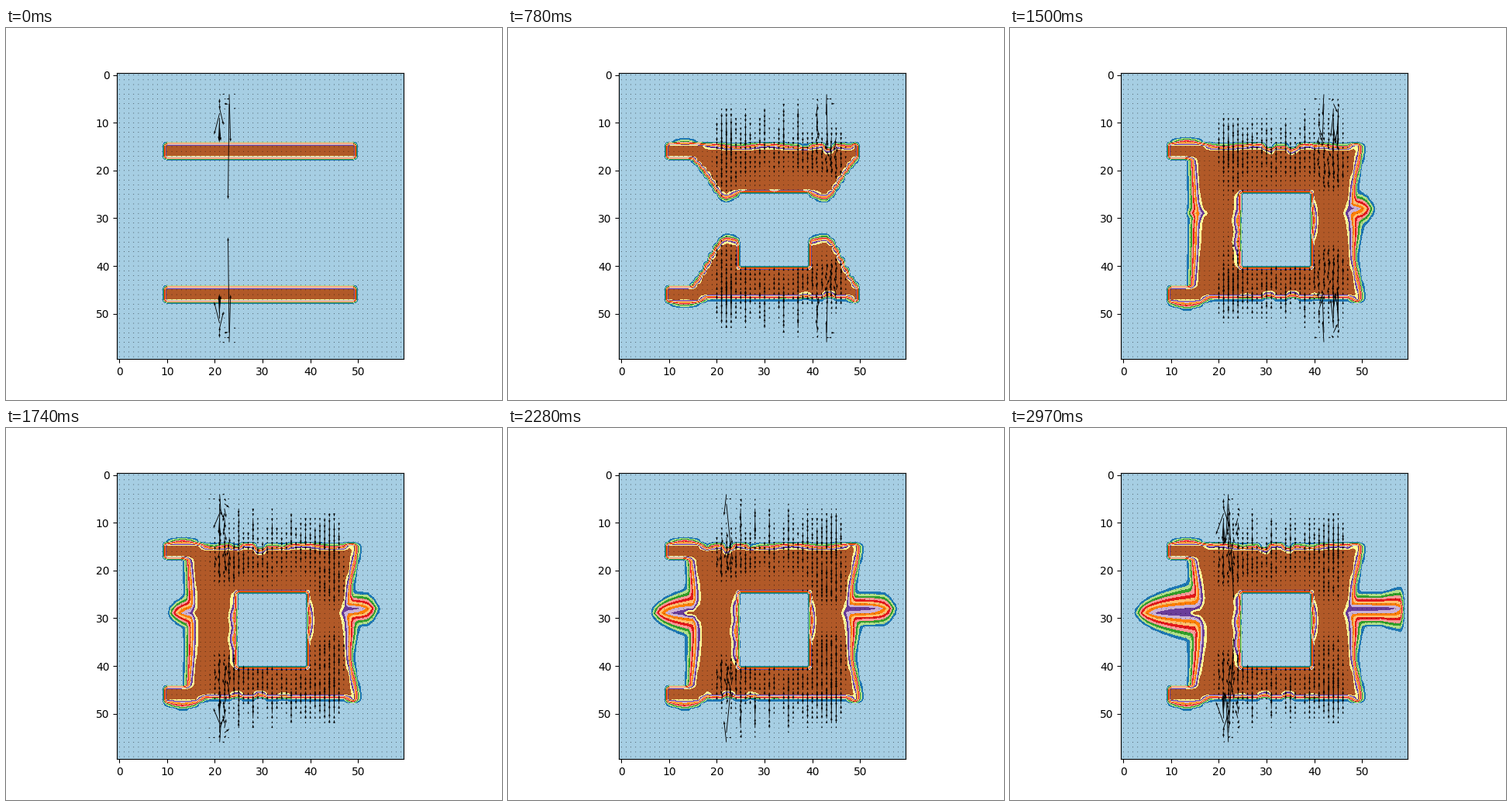
A matplotlib script that plays this animation: 640 by 480 pixels, repeating every 3 s.

```python
import numpy as np
import matplotlib.pyplot as plt
from matplotlib.animation import FuncAnimation

N, FRAMES, STEP = 60, 100, 30
Y, X = np.mgrid[0:N, 0:N].astype(float)
AXIS = np.arange(N, dtype=float)
HOLE = (slice(25, 41), slice(25, 40))

rng = np.random.default_rng(4)
ROUGH = rng.uniform(0.55, 1.45, (N, N))
SWIRL = rng.normal(0, 1, (N, N))


def span(v, a, b):
    return np.clip((v - a) / (b - a), 0, 1)


def smooth(s):
    return s * s * (3 - 2 * s)


def bump(v, center, width):
    return np.exp(-((v - center) / width) ** 2)


def peak(v, center, width):
    return np.exp(-np.abs(v - center) / width)


def ramp(v, rim, solid):
    """Density across an edge: first visible at rim, full at solid."""
    return smooth(np.clip(0.17 + 0.66 * (v - rim) / (solid - rim), 0, 1))


def long_edges(t):
    """Top edge of the upper bar and bottom edge of the lower one."""
    worn = span(t, 0, 400) * span(AXIS, 16, 18) * span(AXIS, 49, 47)
    center = 33 + 11 * np.cos(2 * np.pi * (t - 765) / 3000)
    bite = worn * bump(AXIS, center, 5) * np.maximum(0, np.sin(1.25 * AXIS + t / 200))
    drift = worn * (0.25 + 0.2 * np.sin(0.5 * AXIS + t / 400))
    swell = span(t, 300, 1200) * bump(AXIS, 13.3, 3)
    top = ramp(Y, 14.25 + drift + 0.9 * bite - swell,
               14.75 + 0.4 * worn + drift + 1.4 * bite)
    bottom = ramp(Y, 47.75 - 0.6 * worn - 0.4 * bite + 1.6 * swell,
                  47.25 - 1.25 * worn - 0.8 * bite - 0.2 * swell)
    return top, bottom


def early(t, top, bottom):
    """Two bodies swelling towards each other."""
    s = t / 480
    left = smooth(span(AXIS, 14, 25.5 - 2.2 * s))
    right = smooth(span(AXIS, 50, 36.5 + 4 * s))
    plume = left * right
    ripple = 0.5 * min(s, 1) * plume * np.sin(0.9 * AXIS + 1)
    width = 0.5 + 1.1 * np.sqrt(min(s, 1)) * plume ** 0.5
    upper = 17.75 + 4.6 * s ** 1.24 * plume + ripple
    lower = 44.25 - 6.3 * s ** 1.06 * plume - 0.5 * ripple
    ends = ramp(X, 9.25, 9.75) * ramp(X, 49.75, 49.25)
    return ends * np.maximum(top * ramp(Y, upper, upper - width),
                             bottom * ramp(Y, lower, lower + width))


def tongue(depth, dy, half):
    core = 0.86 * (1 - np.exp(-depth / 1.7))
    return core * np.clip(1 - np.abs(dy) / np.maximum(half, 0.01), 0, 1)


def flanks(t):
    """Left and right sides of the joined body."""
    pinch = span(t, 1500, 1050)
    aged = span(t, 1050, 2970)
    u = span(AXIS, 16, 46)
    belly = np.sin(np.pi * u)
    cusp = span(t, 1500, 2010)

    rim = 13.5 + 8.5 * pinch * peak(AXIS, 30, 4)
    solid = rim + 1.6 + (0.8 + 1.7 * aged) * belly
    solid += (1.4 * (1 - cusp) * (1 - pinch) - 3 * cusp) * peak(AXIS, 29, 1)
    bar = (AXIS < 18) | (AXIS > 44)
    rim, solid = np.where(bar, 9.25, rim), np.where(bar, 9.75, solid)
    left = ramp(X, rim[:, None], solid[:, None])
    shade = (0.8 * span(t, 1050, 2010) * belly * ~bar)[:, None]
    left = np.maximum(left, 0.14 * ramp(X, rim[:, None] - shade, rim[:, None]))

    rim = 49.8 + 0.6 * np.cos(4 * np.pi * u) - 2.5 * pinch * peak(AXIS, 29, 2)
    solid = 48.9 - 2 * belly - (1 + 2 * pinch) * peak(AXIS, 29, 1.5)
    return left * ramp(X, rim[:, None], solid[:, None])


def late(t, top, bottom):
    body = top * bottom * flanks(t)
    tip = 24 - 11 * span(t, 1050, 1500) - 10.7 * span(t, 1500, 2970) ** 0.7
    d = np.maximum(X - tip, 0)
    body = np.maximum(body, tongue(d, Y - 28.8, 2.05 * np.sqrt(d)) * (X < 19))

    d = np.maximum(46 + 15 * span(t, 1050, 2970) ** 0.55 - X, 0)
    flare = 0.35 * span(t, 2280, 2970) * np.maximum(X - 54, 0)
    half = np.minimum(2.6 * np.sqrt(d), 4) + flare
    return np.maximum(body, tongue(d, Y - 28.2, half) * (X > 45) * (X < 59))


def density(t):
    top, bottom = long_edges(t)
    w = span(t, 900, 1050)
    d = np.zeros((N, N))
    if w < 1:
        d += (1 - w) * early(t, top, bottom)
    if w > 0:
        d += w * late(t, top, bottom)

    # thinner fluid beside the block
    along = np.sqrt(np.sin(np.pi * span(Y, 24.5, 40.5)))
    wave = 0.8 + 0.2 * np.sin(1.3 * Y + t / 250)
    strip = 0.45 * (X == 24) + 0.12 * (X == 23)
    d *= 1 - w * (strip * along * wave + 0.4 * (X == 40) * bump(Y, 30.5, 3.5))
    d[HOLE] = 0
    return d


def jet_col(k):
    return int(round(33.1 + 12.3 * np.cos(0.316 * k - 2.51)))


def velocity(i):
    """Jet at the current column plus the sinking, spreading wakes of earlier ones."""
    v = np.zeros((N, N))
    for age in range(1, min(i + 3, 32)):
        amp = 0.5 / (1 + 0.25 * age)
        rows = bump(AXIS, 8 + 0.45 * age, 2.8 + 0.1 * age)
        cols = bump(AXIS, jet_col(i - age), 0.5 + 0.07 * age)
        v += amp * np.outer(rows, cols)
    v = np.minimum(v, 0.6) * ROUGH

    c = jet_col(i)
    close = bump(X, c, 3)
    u = 0.22 * SWIRL * v * close
    u += 0.1 * SWIRL * close * bump(Y, 5.5, 1.8)
    reach = (9 + 11 * max(0, np.cos(2 * np.pi * i / FRAMES)) ** 3) / 6
    v[4, c], v[6, c] = reach / 2, reach

    # the lower half mirrors the upper
    u[31:], v[31:] = u[29:0:-1], -v[29:0:-1]
    u[30] = v[30] = 0
    u[HOLE] = v[HOLE] = 0
    return u, v


fig, ax = plt.subplots(figsize=(6.4, 4.8), dpi=100)
im = ax.imshow(density(0), cmap="Paired", vmin=0, vmax=1, interpolation="bilinear")
arrows = ax.quiver(*velocity(0), scale=10, angles="xy")
ax.set(xlim=(-0.5, 59.5), ylim=(59.5, -0.5),
       xticks=range(0, 60, 10), yticks=range(0, 60, 10))


def update(i):
    im.set_data(density(i * STEP))
    arrows.set_UVC(*velocity(i))
    return im, arrows


anim = FuncAnimation(fig, update, frames=FRAMES, interval=STEP, repeat=True, repeat_delay=0)
plt.show()
```
